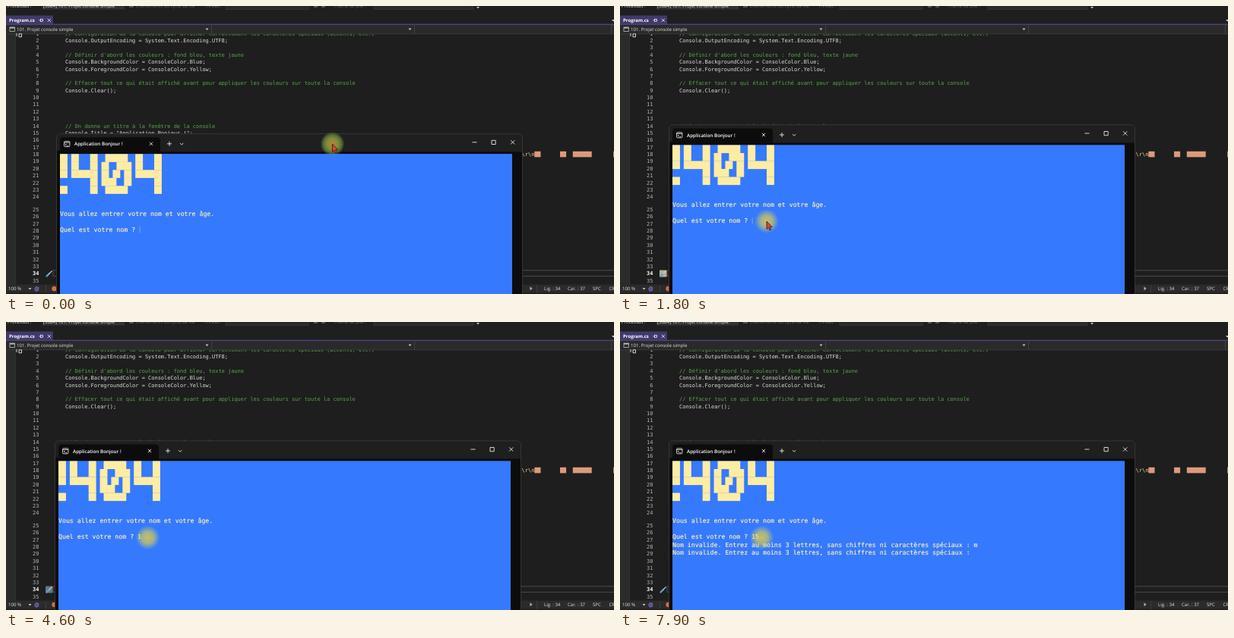
Animation, 800 px wide and 380 px high, one loop 8000 ms. Source, as an HTML page:

```html
<!DOCTYPE html>
<html lang="fr">
<head>
<meta charset="utf-8">
<style>
  html, body { margin: 0; width: 100%; height: 100%; overflow: hidden; background: #1e1e1e; }
  svg { display: block; width: 800px; height: 380px; }
  text { white-space: pre; text-rendering: geometricPrecision; }
  .code { font: 6.977px "DejaVu Sans Mono", monospace; fill: #dcdcdc; }
  .note { fill: #57a64a; }
  .num { fill: #b4b4b4; text-anchor: end; }
  .con { font: 8.24px "DejaVu Sans Mono", monospace; fill: #fff3b0; stroke: #fff3b0; stroke-width: .15; }
  .ui { font: 6.1px "Open Sans", "Noto Sans", sans-serif; fill: #e4e4e4; }
  .dim { fill: #6c6c6c; }
  .bold { font-weight: 600; fill: #fff; }
  .line { fill: none; stroke: #e8e8e8; stroke-width: .9; }
</style>
</head>
<body>
<svg id="stage" viewBox="0 0 800 380">
  <defs>
    <radialGradient id="hover">
      <stop offset="0" stop-color="#ffdc28" stop-opacity=".72"/>
      <stop offset=".5" stop-color="#f0d83c" stop-opacity=".58"/>
      <stop offset=".8" stop-color="#d8d850" stop-opacity=".25"/>
      <stop offset="1" stop-color="#d8d850" stop-opacity="0"/>
    </radialGradient>
    <radialGradient id="press">
      <stop offset="0" stop-color="#c88c40" stop-opacity=".9"/>
      <stop offset=".45" stop-color="#96a040" stop-opacity=".85"/>
      <stop offset=".75" stop-color="#7ca044" stop-opacity=".6"/>
      <stop offset="1" stop-color="#6c9c40" stop-opacity="0"/>
    </radialGradient>
    <clipPath id="editClip"><rect y="37" width="800" height="331"/></clipPath>
  </defs>
  <g id="editor" clip-path="url(#editClip)"></g>
  <g id="chrome"></g>
  <g id="tool"></g>
  <g id="win"></g>
  <g id="mouse">
    <circle id="glow" r="16"/>
    <path id="arrow" d="M0 0V10.5L2.4 8.4L4 12L5.8 11.2L4.2 7.7H7.2Z" fill="#d8483c" stroke="#40100c" stroke-width=".8"/>
  </g>
</svg>
<script>
const $ = id => document.getElementById(id);
const LOOP = 8000, FRAME = 100, CELL = 4.96, ROW = 10.5, CH = 4.2;

function add(parent, tag, attrs, txt) {
  const el = document.createElementNS("http://www.w3.org/2000/svg", tag);
  for (const k in attrs) el.setAttribute(k, attrs[k]);
  if (txt !== undefined) el.textContent = txt;
  parent.appendChild(el);
  return el;
}
const rect = (p, x, y, width, height, fill, more) => add(p, "rect", { x, y, width, height, fill, ...more });
const label = (p, x, y, cls, txt) => add(p, "text", { x, y, class: cls }, txt);
const path = (p, d, more) => add(p, "path", { d, class: "line", ...more });
const caretDown = (p, x, y) => add(p, "path", { d: `M${x - 2} ${y - 1}h4l-2 2.4z`, fill: "#c8c8c8" });
const cross = (p, x, y, r) => path(p, `M${x - r} ${y - r}l${2 * r} ${2 * r}m0 ${-2 * r}l${-2 * r} ${2 * r}`);

// Code editor
const lineY = n => (n < 25 ? 45.5 + (n - 2) * 9.38 : 268.4 + (n - 25) * 9.38) + 2.5;

function buildEditor(g) {
  rect(g, 0, 37, 800, 343, "#1e1e1e");
  rect(g, 0, 37, 12, 331, "#2b2b2b");
  rect(g, 12, 37, .7, 331, "#3a3a3a");
  rect(g, 62, 348.8, 760, 7.6, "none", { stroke: "#4a4a4a", "stroke-width": 1 });
  for (let n = 1; n <= 35; n++) {
    const el = label(g, 43.5, lineY(n), "code num", n);
    if (n === 34) el.style.cssText = "fill:#fff;font-weight:bold";
  }
  const code = {
    1: "// Configuration de la console pour afficher correctement les caractères spéciaux (accents, etc.)",
    2: "Console.OutputEncoding = System.Text.Encoding.UTF8;",
    4: "// Définir d'abord les couleurs : fond bleu, texte jaune",
    5: "Console.BackgroundColor = ConsoleColor.Blue;",
    6: "Console.ForegroundColor = ConsoleColor.Yellow;",
    8: "// Effacer tout ce qui était affiché avant pour appliquer les couleurs sur toute la console",
    9: "Console.Clear();",
    14: "// On donne un titre à la fenêtre de la console",
    15: 'Console.Title = "Application Bonjour !";'
  };
  for (const n in code)
    label(g, 78, lineY(+n), code[n][0] === "/" ? "code note" : "code", code[n]);
  const y = lineY(18);
  label(g, 78 + 143 * CH, y, "code", "\\r\\n").style.fill = "#ffd68f";
  for (const [col, len] of [[147, 2], [155, 2], [159, 6], [171.7, 2]])
    rect(g, 78 + col * CH, y - 6.3, len * CH - .3, 7.6, "#dc9a7c");
}

function buildChrome(g) {
  rect(g, 0, 0, 800, 25, "#1f1f1f");
  rect(g, 48, -5, 108, 9.5, "#333");
  rect(g, 289, -5, 109, 9.5, "#2a2a2a", { stroke: "#3c3c3c", "stroke-width": .7 });
  rect(g, 484, -5, 131, 9.5, "#2a2a2a", { stroke: "#3c3c3c", "stroke-width": .7 });
  label(g, 2, 1.8, "ui", "Processus :");
  label(g, 49, 1.8, "ui", "[5684] 101. Projet console simple");
  label(g, 171, 1.8, "ui dim", "Événements du cycle de vie");
  label(g, 261, 1.8, "ui dim", "Thread :");
  label(g, 432, 1.8, "ui dim", "Frame de pile :");
  rect(g, 162, 0, 6, 2, "#555");
  rect(g, 405, 0, 5, 2, "#555");
  rect(g, 415, 0, 5, 2, "#555");
  caretDown(g, 621, 2);

  rect(g, 0, 12.5, 62, 12, "#41396b");
  rect(g, 0, 23.6, 800, 1.4, "#4b4180");
  label(g, 4, 21, "ui bold", "Program.cs").style.fontWeight = 700;
  path(g, "M43.5 18.8h2m0-2v4m0-3.4h3v2.8h-3", { "stroke-width": .7 });
  cross(g, 56.8, 18.8, 2);

  rect(g, 0, 25, 800, 12, "#2a2a2a");
  rect(g, 0, 36.4, 800, .8, "#3d3d3d");
  rect(g, 5, 28, 6.5, 5.5, "none", { stroke: "#b8b8b8", "stroke-width": .8 });
  rect(g, 5, 28, 6.5, 1.6, "#b8b8b8");
  label(g, 14, 33.2, "ui", "101. Projet console simple");
  for (const x of [264.5, 531.5]) {
    caretDown(g, x, 30.5);
    rect(g, x + 5.5, 25.5, .8, 11, "#484848");
  }
  rect(g, 796, 25, .8, 12, "#484848");
  caretDown(g, 799, 19);
  path(g, "M14 36v4M17 36.8h3.5v4H17z", { "stroke-width": .8 });

  rect(g, 0, 367.5, 800, 12.5, "#2b2b2b");
  rect(g, 0, 378.6, 800, 1.4, "#1c1c1c");
  label(g, 3, 375.3, "ui", "100 %");
  caretDown(g, 31.5, 373);
  add(g, "path", { d: "M37.5 373.5l2-3.2 3.5 1.2-.6 4-3.2.8z", fill: "#5a4c96", stroke: "#9484d0", "stroke-width": .6 });
  rect(g, 52, 369, .7, 9, "#484848");
  add(g, "circle", { cx: 63.5, cy: 373, r: 3.2, fill: "#d8703c" });
  add(g, "path", { d: "M689.5 370.3v5l3.2-2.5z", fill: "#b0b0b0" });
  rect(g, 698, 368, .7, 11, "#454545");
  [[708, "Lig. : 34"], [739, "Car. : 37"], [772, "SPC"], [793.5, "CRLF"]]
    .forEach(([x, t]) => label(g, x, 375.3, "ui", t));
}

// Screwdriver in the margin, sometimes with a button face behind it
function buildTool(g) {
  const face = rect(g, 52, 348.5, 9.5, 9, "#7f929a", { rx: 1 });
  path(g, "M53.5 356.5l3-3", { style: "stroke:#5aa0d8;stroke-width:2.4;stroke-linecap:round" });
  path(g, "M56.5 353.5l4-4", { style: "stroke:#c8d0d4;stroke-width:1.1" });
  return face;
}

// Console window, laid out at its resting place
const BANNER = [
  "## ##  ##  ######  ##  ##",
  "## ##  ## ##  #### ##  ##",
  "## ####### ## ## ## #######",
  "        ## ####  ##      ##",
  "##      ##  ######       ##"
];
BANNER[0] = "## ##   ##  ######  ##   ##";
BANNER[1] = "## ##   ## ##  #### ##   ##";

function buildWindow(g) {
  rect(g, 64.5, 156.8, 613, 240, "#1f1f1f", { rx: 5, stroke: "#3c3c3c", "stroke-width": .8 });
  rect(g, 65, 179, 612, 220, "#0c0c0c");
  rect(g, 65, 176, 612, 3, "#1f1f1f");
  rect(g, 201, 176, 476, 4.5, "#1f1f1f");
  rect(g, 69, 161.5, 132, 26, "#0c0c0c", { rx: 4 });
  rect(g, 74.5, 166.8, 7.4, 7, "none", { stroke: "#ddd", "stroke-width": .9, rx: 1 });
  path(g, "M74.5 168.4h7.4M76 170.2l1.4 1-1.4 1m2.4 .2h1.8", { "stroke-width": .7 });
  label(g, 88, 172.6, "ui bold", "Application Bonjour !").style.fontSize = "6.3px";
  cross(g, 189, 170, 2.1);
  path(g, "M210 170h6m-3-3v6M227 169.2l2.2 2 2.2-2");
  path(g, "M611.5 168h6M637 165.5h5.2v5.2H637z");
  cross(g, 664.7, 168, 2.6);

  rect(g, 69, 183.3, 595, 200, "#3579ff");
  BANNER.forEach((row, r) => {
    for (const m of row.matchAll(/#+/g))
      rect(g, 69 + m.index * CELL, 183.5 + r * ROW, m[0].length * CELL, ROW + .1, "#ffeca3");
  });
  label(g, 69, 265, "con", "Vous allez entrer votre nom et votre âge.");
}

buildEditor($("editor"));
buildChrome($("chrome"));
const face = buildTool($("tool"));
buildWindow($("win"));
const rows = [0, 1, 2].map(i => label($("win"), 69, 286 + i * ROW, "con", ""));
const caret = rect($("win"), 0, 0, 1, 8.6, "#a8b4b8", { opacity: .7 });

// Console input over time: [from ms, answer, row]
const ASK = "Quel est votre nom ? ";
const RETRY = "Nom invalide. Entrez au moins 3 lettres, sans chiffres ni caractères spéciaux : ";
const KEYS = [[0, "", 0], [4600, "1", 0], [4900, "15", 0], [5500, "", 1], [6800, "m", 1], [7300, "", 2]];

// Pointer and window tracks: [ms, x, y]
const POINTER = [[0, 429.5, 182], [600, 428, 170], [1000, 428, 170], [1700, 193, 284], [2000, 193, 284], [2600, 186.5, 284.5]];
const WINDOW = [[0, 2, 11.8], [600, 0, 0]];

function at(track, t) {
  const i = track.findIndex(k => k[0] > t);
  if (i < 0) return track[track.length - 1].slice(1);
  const a = track[i - 1], b = track[i];
  const u = (t - a[0]) / (b[0] - a[0]), e = u * u * (3 - 2 * u);
  return [a[1] + (b[1] - a[1]) * e, a[2] + (b[2] - a[2]) * e];
}

function draw(t) {
  const place = ([x, y]) => `translate(${x.toFixed(2)} ${y.toFixed(2)})`;
  $("win").setAttribute("transform", place(at(WINDOW, t)));
  $("mouse").setAttribute("transform", place(at(POINTER, t)));
  $("glow").setAttribute("fill", t < 900 ? "url(#press)" : "url(#hover)");
  $("arrow").style.display = t < 4600 ? "" : "none";

  const past = KEYS.filter(k => k[0] <= t);
  const [since, , row] = past[past.length - 1];
  rows.forEach((el, i) => {
    const typed = past.filter(k => k[2] === i).pop();
    el.textContent = typed ? (i ? RETRY : ASK) + typed[1] : "";
  });
  const beat = t % 1060;
  const lit = t < 4900 ? beat >= 700 || beat < 170 : (t - since) % 1060 < 530;
  caret.setAttribute("x", 69.5 + rows[row].textContent.length * CELL);
  caret.setAttribute("y", 279 + row * ROW);
  caret.style.display = lit ? "" : "none";

  face.style.display = (t >= 500 && t < 2500) || (t >= 4400 && t < 5300) ? "" : "none";
  face.setAttribute("fill", t >= 1500 && t < 2500 ? "#b8b094" : "#66777f");
}

const start = performance.now();
function tick() {
  const t = (performance.now() - start) % LOOP;
  draw(Math.floor(t / FRAME) * FRAME);
  requestAnimationFrame(tick);
}
draw(0);
requestAnimationFrame(tick);
</script>
</body>
</html>
```
